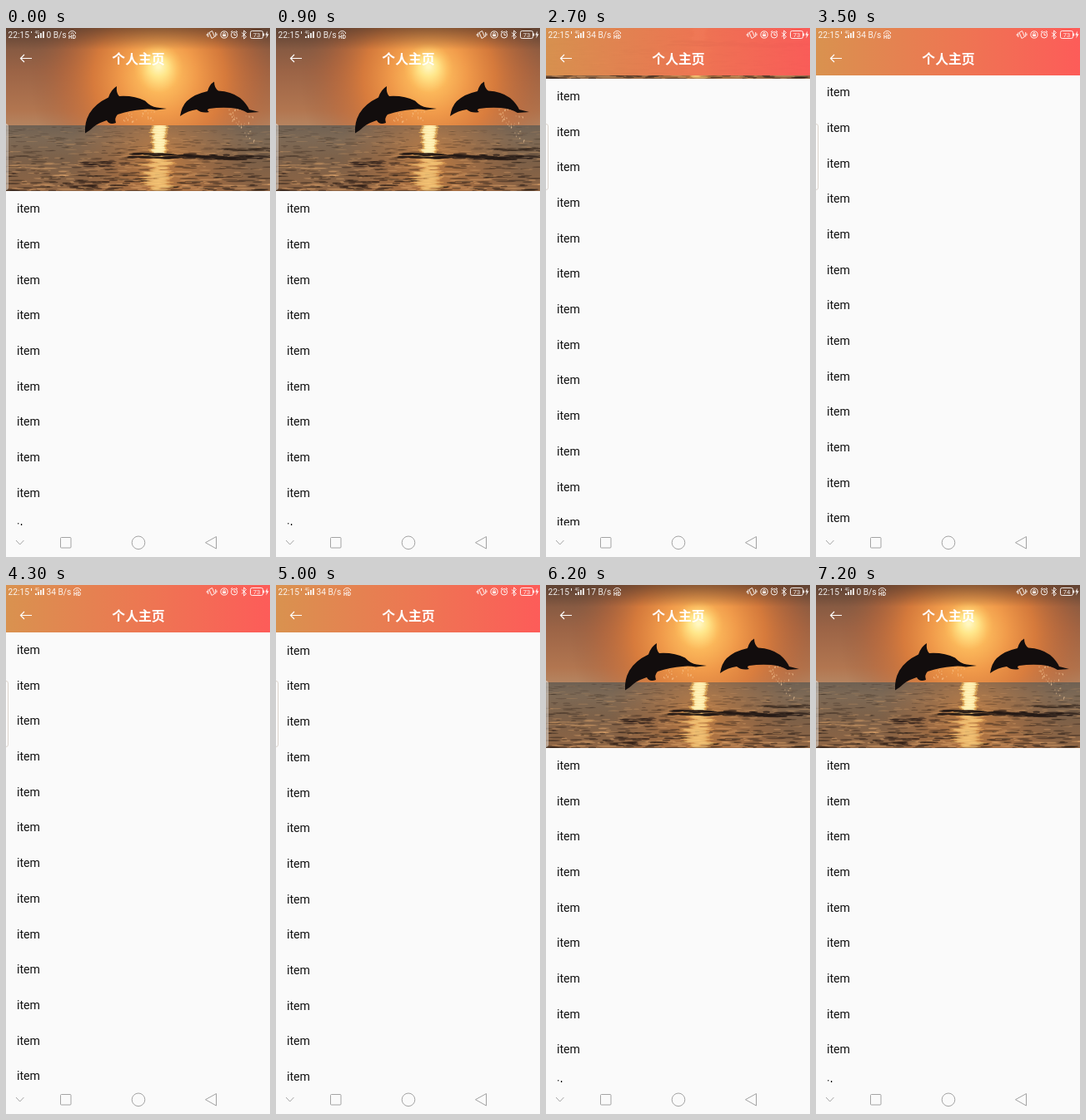
These frames come from a looping animation (317 px wide and 636 px high, 8 s). An HTML page with a canvas:

```html
<!DOCTYPE html>
<html lang="zh">
<head>
<meta charset="utf-8">
<title>个人主页</title>
<style>
html, body { margin: 0; width: 100%; height: 100%; overflow: hidden; background: #fafafa; }
canvas { display: block; width: 317px; height: 636px; }
</style>
</head>
<body>
<canvas id="stage" width="317" height="636"></canvas>
<script>
const W = 317, LOOP = 8000;
const BAR = 57, HEADER = 196, NAV = 598;
const ROW = 42.68, TOP = 217.3;
const ctx = document.getElementById('stage').getContext('2d');
const photo = paintPhoto();

function random(seed) {
  return () => (seed = (seed * 16807) % 2147483647) / 2147483647;
}

function gradient(c, coords, stops) {
  const g = coords.length === 4
    ? c.createLinearGradient(...coords)
    : c.createRadialGradient(...coords);
  stops.forEach(([at, color]) => g.addColorStop(at, color));
  return g;
}

function fillPath(c, d, color) {
  c.fillStyle = color;
  c.fill(new Path2D(d));
}

function strokePath(d, color, width = 1) {
  ctx.strokeStyle = color;
  ctx.lineWidth = width;
  ctx.stroke(new Path2D(d));
}

function ring(x, y, r, color, width = 1) {
  ctx.beginPath();
  ctx.arc(x, y, r, 0, Math.PI * 2);
  ctx.strokeStyle = color;
  ctx.lineWidth = width;
  ctx.stroke();
}

function label(text, x, y, font, color, align = 'left') {
  ctx.font = font;
  ctx.fillStyle = color;
  ctx.textAlign = align;
  ctx.fillText(text, x, y);
}

// Sunset sea with two leaping dolphins, painted once.
function paintPhoto() {
  const cv = document.createElement('canvas');
  cv.width = W;
  cv.height = HEADER;
  const c = cv.getContext('2d');
  const rnd = random(77);
  const sea = 117;

  const ripple = (x, y, rx, ry, color) => {
    c.beginPath();
    c.ellipse(x, y, rx, ry, 0, 0, Math.PI * 2);
    c.fillStyle = color;
    c.fill();
  };

  // Sky and sun
  c.fillStyle = gradient(c, [0, 0, 0, sea], [[0, '#74523f'], [0.45, '#9c6446'], [0.85, '#b27650'], [1, '#b58460']]);
  c.fillRect(0, 0, W, sea);
  c.fillStyle = gradient(c, [184, 56, 3, 184, 62, 155], [
    [0, '#ffdf86'], [0.12, '#fbb75a'], [0.28, '#f09a4a'],
    [0.5, 'rgba(224,126,58,.85)'], [0.75, 'rgba(192,104,56,.45)'], [1, 'rgba(150,90,60,0)']]);
  c.fillRect(0, 0, W, sea);
  c.fillStyle = gradient(c, [183, 46, 2, 183, 48, 30], [
    [0, '#fff7c0'], [0.35, 'rgba(255,232,140,.9)'], [1, 'rgba(255,190,90,0)']]);
  c.fillRect(140, 10, 90, 80);
  c.fillStyle = gradient(c, [0, 0, 0, 26], [[0, 'rgba(80,55,42,.6)'], [1, 'rgba(80,55,42,0)']]);
  c.fillRect(0, 0, W, 26);

  // Sea
  c.fillStyle = gradient(c, [0, sea, 0, HEADER], [
    [0, '#6f6153'], [0.2, '#7d6955'], [0.55, '#7c6048'], [1, '#8f6544']]);
  c.fillRect(0, sea, W, HEADER - sea);
  c.fillStyle = gradient(c, [186, 158, 5, 186, 158, 110], [[0, 'rgba(224,140,66,.6)'], [1, 'rgba(190,110,56,0)']]);
  c.fillRect(0, sea, W, HEADER - sea);
  for (let i = 0; i < 650; i++) {
    const depth = rnd();
    const dark = rnd() < 0.55;
    ripple(rnd() * W, sea + 2 + depth * (HEADER - sea), 2 + rnd() * (4 + depth * 8), 0.4 + depth * 0.6,
      dark ? `rgba(42,30,24,${0.2 + depth * 0.35})` : `rgba(232,172,112,${0.15 + depth * 0.3})`);
  }

  // Sun reflection
  for (let y = sea + 1; y < HEADER; y += 1.5) {
    const near = y < 150;
    const half = near ? 8 + rnd() * 5 : 6 + rnd() * 16;
    const x = 184 + (rnd() - 0.5) * (near ? 3 : 14);
    ripple(x, y, half, 1, near ? 'rgba(255,196,96,.7)' : 'rgba(250,180,92,.55)');
    ripple(x, y, half * 0.75, 0.9, near ? 'rgba(255,246,190,.95)' : 'rgba(255,224,146,.45)');
  }

  // Dark swell and shadows
  for (let i = 0; i < 70; i++) {
    const across = rnd();
    ripple(150 + across * 167, 153 + across * 3 + (rnd() - 0.5) * 6, 4 + rnd() * 11, 0.5 + rnd() * 0.8, 'rgba(36,26,22,.75)');
  }
  for (let i = 0; i < 22; i++) {
    ripple(262 + rnd() * 55, 144.5 + rnd() * 3, 3 + rnd() * 8, 0.6, 'rgba(50,36,28,.6)');
    ripple(92 + rnd() * 55, 160 + rnd() * 7, 3 + rnd() * 7, 0.7, 'rgba(46,32,26,.6)');
    ripple(75 + rnd() * 75, 183 + rnd() * 12, 3 + rnd() * 9, 0.9, 'rgba(46,30,24,.6)');
  }

  // Spray
  for (let i = 0; i < 75; i++) {
    const right = i > 28;
    const spread = rnd();
    const x = right ? 266 + spread * 32 : 140 + spread * 38;
    const y = right ? 96 + rnd() * (10 + spread * 34) : 97 + rnd() * 15;
    c.fillStyle = `rgba(255,215,165,${0.2 + rnd() * 0.5})`;
    c.fillRect(x, y, 1, 1 + rnd() * 1.5);
  }

  const body = '#120d0d';
  fillPath(c, 'M95 126.500Q94 114 100 103Q107 91 123 83.500Q126 74 133 70Q132 78 136 82Q154 81 167 87.500Q174 95 181 95.500L193 97L180 98.500Q171 97 164 98Q149 99 134 104Q130 108 132 114Q124 117 121 111Q111 114 105 119Q100 124 95 126.500Z', body);
  fillPath(c, 'M209 106Q211 94 217 88Q227 79 242 76Q244 68 250 64.500Q250 72 255 75.500Q270 76 281 84Q289 91 292 98L304 101L290 102Q282 97 270 96Q257 95 244 97Q240 98 244 101Q235 103 229 98Q219 99 209 106Z', body);
  return cv;
}

// Centre of the first list row.
function rowTop(t) {
  if (t < 2300) return TOP;
  if (t < 2800) {
    const k = (t - 2300) / 500;
    return TOP + (76.4 - TOP) * (1 - (1 - k) ** 2);
  }
  if (t < 6100) return 77.2 + (Math.min(t, 5900) - 3500) / 930;
  if (t < 6200) return 160;
  return TOP - 0.3;
}

function drawList(y) {
  ctx.save();
  ctx.beginPath();
  ctx.rect(0, BAR, W, NAV - BAR);
  ctx.clip();
  for (; y < 620; y += ROW) label('item', 13, y + 5, '14.1px Roboto, sans-serif', '#111');
  ctx.restore();
}

function drawHeader(y) {
  const height = Math.max(BAR, Math.round(y - 21.5));
  ctx.drawImage(photo, 0, height - HEADER);
  ctx.globalAlpha = (HEADER - height) / (HEADER - BAR);
  ctx.fillStyle = gradient(ctx, [0, 0, W, 0], [[0, '#d9924f'], [0.5, '#ec7852'], [1, '#fd5c59']]);
  ctx.fillRect(0, 0, W, BAR);
  ctx.globalAlpha = 1;
  strokePath('M31 36.500H17.500M22 32L17.500 36.500L22 41', '#fff', 1.2);
  label('个人主页', 159, 43, 'bold 15.85px "Noto Sans CJK SC", "Noto Sans CJK", sans-serif', '#fff', 'center');
}

function drawStatus(t) {
  const ink = 'rgba(255,255,255,.9)';
  const font = '10.2px Roboto, sans-serif';
  const idle = t < 2300 || t >= 7200;
  const speed = idle ? '0 B/s' : t < 5200 ? '34 B/s' : '17 B/s';
  label('22:15', 2.5, 12, font, ink);
  label(speed, 48.5, 12, font, ink);

  ctx.fillStyle = ink;
  ctx.fillRect(30, 4, 1, t < 900 ? 2 : 3);
  label('4G', 34.5, 7, '4.5px Roboto, sans-serif', ink);
  for (let i = 0; i < 4; i++) ctx.fillRect(35 + i * 3, 10 - i * 2, 1.8, 2 + i * 2);

  const hd = idle ? 75 : 81;
  label('HD', hd + 4.5, 12.5, 'bold 6.5px Roboto, sans-serif', ink, 'center');
  strokePath(`M${hd + 0.5} 7V5.500Q${hd + 4.5} 1.500 ${hd + 8.5} 5.500V7M${hd + 2.5} 7Q${hd + 4.5} 4.500 ${hd + 6.5} 7`, ink);

  // Vibrate, lock, alarm, bluetooth
  strokePath('M244 5.500L247.500 3.500L250.500 10.500L247 12.500ZM242.800 5.500V11M251.700 5V10.500M241.300 7V9.500M253 6.500V9', ink);
  ring(262, 8, 4.1, ink);
  ctx.fillStyle = ink;
  ctx.fillRect(260, 7.5, 4, 2.7);
  strokePath('M260.800 7.500V6Q262 4.700 263.200 6V7.500', ink, 0.8);
  ring(274, 8.3, 3.7, ink);
  strokePath('M274 6V8.500H276M270 5L272 3.300M278 5L276 3.300', ink);
  strokePath('M283 5.500L288.500 10.500L285.700 13V3L288.500 5.500L283 10.500', ink);

  // Battery
  ctx.beginPath();
  ctx.roundRect(293.5, 3.5, 15, 9, 2);
  ctx.stroke();
  ctx.fillRect(309, 6.5, 1.2, 3);
  label(t < 7200 ? '73' : '74', 301, 10.8, '7.5px Roboto, sans-serif', ink, 'center');
  fillPath(ctx, 'M313.800 3.500L311.300 8.500H313L312.300 12.500L315.500 7.200H313.600Z', ink);
}

function drawHandle(y) {
  ctx.beginPath();
  ctx.roundRect(-4, 115.5, 6.5, 79, 2.5);
  ctx.fillStyle = 'rgba(255,255,255,.4)';
  ctx.fill();
  ctx.strokeStyle = y > 150 ? 'rgba(225,215,205,.5)' : '#dcd3cc';
  ctx.lineWidth = 1;
  ctx.stroke();
}

function drawNav() {
  const ink = '#a3a3a3';
  strokePath('M12 616L16.700 621L21.400 616', ink);
  ctx.beginPath();
  ctx.roundRect(65.5, 612.5, 12.5, 12.5, 1);
  ctx.stroke();
  ring(159, 618.8, 7.8, ink);
  ctx.lineJoin = 'round';
  strokePath('M239.500 618.700L252.500 611.500V626Z', ink);
  ctx.lineJoin = 'miter';
}

function draw(now) {
  const t = Math.floor((now % LOOP) / 100) * 100;
  const y = rowTop(t);
  ctx.fillStyle = '#fafafa';
  ctx.fillRect(0, 0, W, 636);
  drawList(y);
  drawHeader(y);
  drawStatus(t);
  drawHandle(y);
  drawNav();
}

const start = performance.now();
function tick() {
  draw(performance.now() - start);
  requestAnimationFrame(tick);
}
tick();
</script>
</body>
</html>
```
